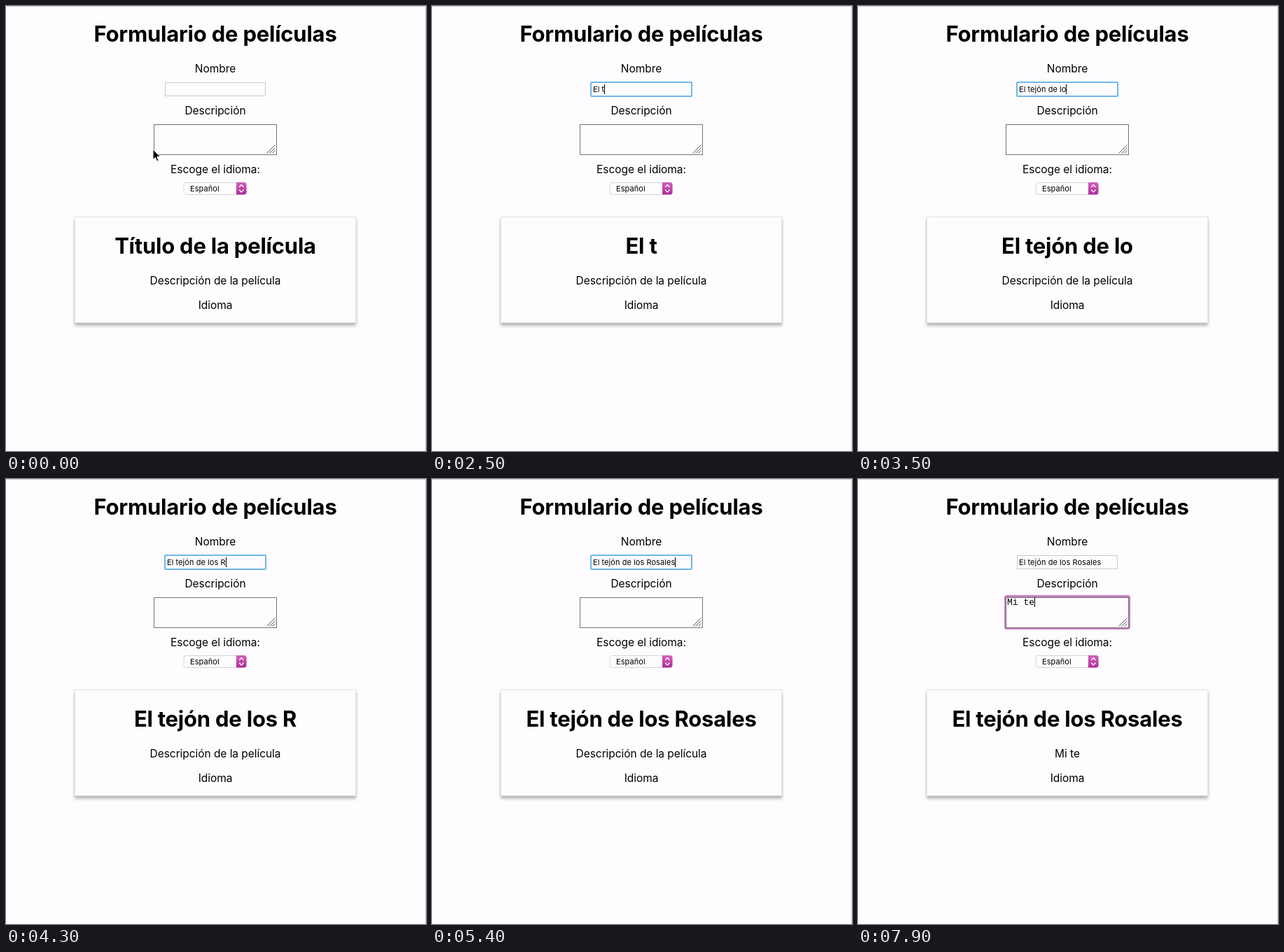
An HTML page that plays this animation: 600x636 px, repeating every 8000 ms.

```html
<!DOCTYPE html>
<html lang="es">
<head>
<meta charset="utf-8">
<title>Formulario de películas</title>
<style>
  html, body { margin: 0; width: 100%; height: 100%; overflow: hidden; background: #fefcff; }
  svg { display: block; width: 600px; height: 636px; }
  text { font: 15.5px Inter, sans-serif; font-optical-sizing: none; letter-spacing: -.05px; text-anchor: middle; white-space: pre; }
  .big { font-size: 31px; font-weight: 700; letter-spacing: -.22px; }
  .small { font-size: 11px; letter-spacing: .06px; text-anchor: start; }
  .mono { font: 13px "Liberation Mono", monospace; letter-spacing: 0; text-anchor: start; }
  .card { fill: #fefcff; filter: drop-shadow(0 4px 2px rgba(0,0,0,.25)) drop-shadow(0 0 1px rgba(0,0,0,.1)); }
  .line { fill: none; stroke-linecap: round; stroke-linejoin: round; }
</style>
</head>
<body>
<svg viewBox="0 0 600 636">
  <defs>
    <linearGradient id="pink" x2="0" y2="1">
      <stop stop-color="#cf62b7"/><stop offset="1" stop-color="#b02c99"/>
    </linearGradient>
    <path id="stem" d="M-4 -8Q0 -8 0 -5Q0 -8 4 -8M0 -5V5M-4 8Q0 8 0 5Q0 8 4 8M-2 2H2"/>
  </defs>

  <rect width="600" height="636" fill="#fefcff"/>
  <path d="M0 .5H600M599.5 0V636" stroke="#c9c8ca"/>

  <text class="big" x="299" y="50.5">Formulario de películas</text>
  <text x="299" y="94.5">Nombre</text>
  <text x="299" y="155">Descripción</text>
  <text x="299" y="238.5">Escoge el idioma:</text>

  <rect x="227.5" y="109.5" width="143" height="19" fill="#fefcff" stroke="#c9c8cb"/>
  <rect id="nameRing" x="227" y="109" width="144" height="20" rx="1" fill="none" stroke="#6db9e8" stroke-width="2"/>
  <text id="name" class="small" x="230" y="123"></text>

  <rect id="descRing" x="210.5" y="167.5" width="177" height="46" rx="2" fill="none" stroke="#c47fbd" stroke-width="3"/>
  <rect x="211.5" y="169.5" width="175" height="43" fill="#fefcff" stroke="#757376"/>
  <path d="M372.5 210.5L384.5 198.5M376.5 210.5L384.5 202.5M380.5 210.5L384.5 206.5" stroke="#5c5b5d"/>
  <text id="desc" class="mono" x="213" y="180"></text>

  <rect x="254" y="252.5" width="89" height="17" rx="3.5" fill="#fefcff" stroke="#d5d3d6"/>
  <path d="M329 252H340Q343.5 252 343.5 255.5V266Q343.5 269.5 340 269.5H329Z" fill="url(#pink)"/>
  <path class="line" d="M333.5 258.5L336.3 255.5L339.1 258.5M333.5 263L336.3 266L339.1 263" stroke="#fff" stroke-width="1.3"/>
  <text class="small" x="263" y="265">Español</text>

  <rect class="card" x="98" y="301" width="402" height="152"/>
  <rect x="98.5" y="301.5" width="401" height="151" fill="none" stroke="#e8e6e9"/>
  <text id="title" class="big" x="299" y="354"></text>
  <text id="summary" x="299" y="398"></text>
  <text x="299" y="433">Idioma</text>

  <rect id="caret" width="1" height="14"/>
  <path id="arrow" d="M0 0V14.5L3.3 11.4L5.5 16.8L7.9 15.8L5.7 10.5H10.3Z" stroke="#fff" stroke-linejoin="round"/>
  <g id="beam" class="line">
    <use href="#stem" stroke="#fff" stroke-width="2.6"/>
    <use href="#stem" stroke="#111" stroke-width="1.2"/>
  </g>
</svg>
<script>
  const LOOP = 8000;
  const NAME = "El tejón de los Rosales";
  const DESC = "Mi te";

  // Key press times, one per character
  const nameKeys = [2200, 2300, 2400, 2500, 2600, 2700, 2800, 2900, 3100, 3100, 3200, 3300,
    3400, 3500, 3600, 3700, 4300, 4800, 4900, 5000, 5100, 5300, 5400];
  const descKeys = [7400, 7600, 7700, 7800, 7900];
  const caretFlips = [1200, 1600, 2100, 3900, 4300, 4500, 4700, 5600, 6100, 7000, 7300];
  const NAME_FOCUS = 1200, DESC_FOCUS = 6400;

  // Pointer stops: time, shape, x, y
  const stops = [
    [0, "arrow", 210, 205], [100, "arrow", 238, 122], [200, "beam", 279, 49],
    [400, "arrow", 330, 72], [500, "arrow", 402, 190], [600, "beam", 414, 343],
    [700, "beam", 300, 339], [800, "arrow", 215, 226], [900, "beam", 272, 116],
    [2200, "none"],
    [5800, "beam", 272, 116], [5900, "beam", 274, 121], [6000, "arrow", 278, 134],
    [6100, "beam", 281, 151], [6200, "beam", 285, 178], [6300, "beam", 288, 187],
    [6400, "beam", 290, 190], [7400, "none"]
  ];

  const el = {};
  for (const node of document.querySelectorAll("[id]")) el[node.id] = node;

  const passed = (times, t) => times.filter(at => at <= t).length;
  const show = (node, on) => { node.style.display = on ? "" : "none"; };
  const write = (node, text) => {
    if (node.textContent !== text) node.textContent = text;
  };
  const typed = (text, keys, t) => text.slice(0, passed(keys, t));
  const solid = text => text.replace(/ /g, "\u00a0");

  function placeCaret(field, x, y) {
    const width = field.textContent ? field.getComputedTextLength() : 0;
    el.caret.setAttribute("x", Math.round(x + width));
    el.caret.setAttribute("y", y);
  }

  function drawPointer(t) {
    const [, shape, x, y] = stops.filter(s => s[0] <= t).pop();
    for (const kind of ["arrow", "beam"]) show(el[kind], kind === shape);
    if (el[shape]) el[shape].setAttribute("transform", `translate(${x} ${y})`);
  }

  function draw(t) {
    const name = typed(NAME, nameKeys, t);
    const desc = typed(DESC, descKeys, t);
    write(el.name, solid(name));
    write(el.desc, solid(desc));
    write(el.title, name.trimEnd() || "Título de la película");
    write(el.summary, desc.trimEnd() || "Descripción de la película");

    const inDesc = t >= DESC_FOCUS;
    show(el.nameRing, t >= NAME_FOCUS && !inDesc);
    show(el.descRing, inDesc);
    show(el.caret, passed(caretFlips, t) % 2);
    if (inDesc) placeCaret(el.desc, 213, 169);
    else placeCaret(el.name, 230, 112);
    drawPointer(t);
  }

  const start = performance.now();
  function tick() {
    draw((performance.now() - start) % LOOP);
    requestAnimationFrame(tick);
  }
  tick();
</script>
</body>
</html>
```
